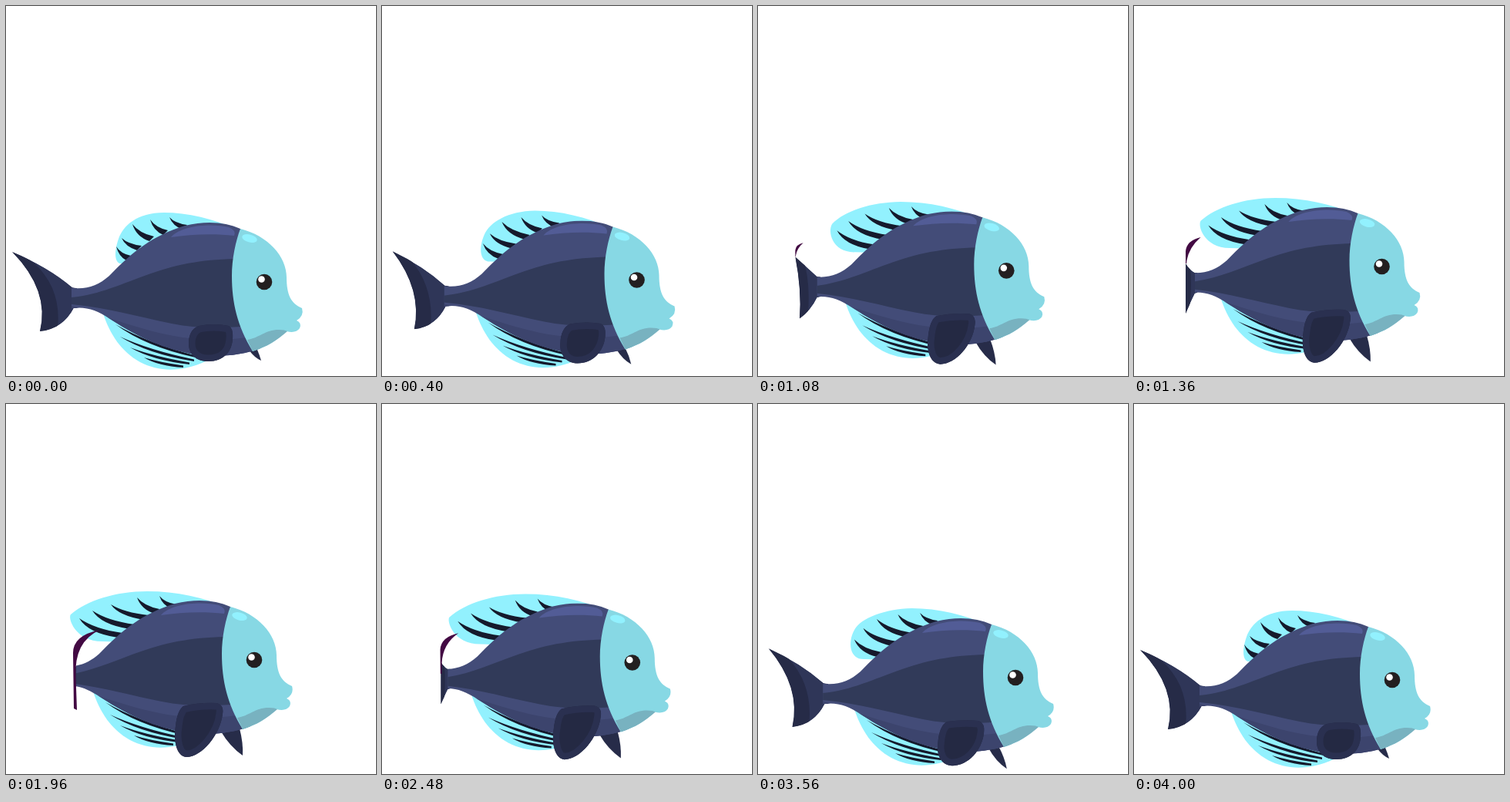
Recreate the animation shown at these times as an HTML page. Size 480 by 480 pixels, loop 4.04 s.

```html
<!DOCTYPE html>
<html lang="en">
<head>
<meta charset="utf-8">
<title>Swimming fish</title>
<style>
  html, body { margin: 0; width: 100%; height: 100%; overflow: hidden; background: #fff; }
  svg { display: block; width: 100vw; height: 100vh; }
</style>
</head>
<body>
<svg viewBox="0 0 480 480">
  <defs>
    <clipPath id="bodyClip">
      <path d="M80 365C102 369 118 364 134 350C165 318 190 298 232 285C262 278 285 281 304 289L340 340L330 444C300 456 260 456 235 450C190 440 160 422 135 406C115 393 102 389 80 393Z"/>
    </clipPath>
    <clipPath id="rootClip"><rect id="root" y="200" width="400" height="280"/></clipPath>
    <clipPath id="tailClip"><path id="tailEdge"/></clipPath>
    <clipPath id="pectoralClip"><path id="pectoralEdge"/></clipPath>
  </defs>
  <g id="fish">
    <g clip-path="url(#tailClip)">
      <path id="tail" fill="#2f3658"/>
      <path id="tailShade" fill="#262b47"/>
    </g>
    <path id="dorsal" fill="#92f1fe"/>
    <path id="spines" fill="#151a2c"/>
    <path id="fold" fill="#430a43"/>

    <path fill="#92f1fe" d="M126 399C135 426 149 448 174 462C199 475 228 475 259 461L260 430Z"/>
    <g id="rays" fill="#151a2c"></g>

    <path id="pelvic" fill="#272c49"/>

    <g clip-path="url(#rootClip)">
      <g clip-path="url(#bodyClip)">
        <path fill="#434c78" d="M70 260H345V470H70Z"/>
        <path fill="#3c446d" d="M70 384C130 402 190 428 250 432C285 434 305 432 335 426V470H70Z"/>
        <path fill="#313a59" d="M70 379C115 378 145 362 188 347C225 334 260 328 305 328V416C270 418 245 418 215 412C165 402 125 389 70 386Z"/>
        <path fill="#525c96" d="M214 300C228 284 268 282 289 287Q299 291 296 298C270 295 240 296 214 300Z"/>
      </g>
    </g>

    <path fill="#87d8e4" d="M304 289C340 298 364 325 364 352C364 375 370 386 384 392Q387 402 377 408Q384 411 381 418Q376 425 364 422C350 435 340 441 320 448C300 415 293 385 293 350C293 328 298 305 304 289Z"/>
    <path fill="#78b2c0" d="M313 433C328 431 336 420 354 420Q362 420 365 422C350 435 340 441 320 448Z"/>
    <ellipse cx="316" cy="301.5" rx="10" ry="5" transform="rotate(14 316 301.5)" fill="#92f1fe"/>
    <circle cx="335" cy="358" r="10.3" fill="#231f20"/>
    <circle cx="331.5" cy="354.5" r="4.3" fill="#fff"/>

    <path id="pectoral" fill="#242943"/>
    <path id="pectoralRim" fill="none" stroke="#2a3050" stroke-width="17" clip-path="url(#pectoralClip)"/>
  </g>
</svg>
<script>
const LOOP = 4040, STEP = 40;
const el = id => document.getElementById(id);
const setPath = (id, d) => el(id).setAttribute('d', d);

// Keys: [time, value]
const drift = [[0, 0], [560, -7], [760, -10], [1140, -13], [1360, -13.5], [1960, -13],
  [2240, -12], [2800, -7], [2960, -5], [3360, -2], [3560, -1], [4000, 0]];
const finKeys = [[0, 0], [760, 1], [1360, 1.88], [1960, 2], [2960, 1.9], [3560, .9], [4000, 0]];
const tailKeys = [[0, 0], [560, .55], [760, 1], [1140, 1.63], [1360, 2], [1960, 3],
  [2800, 1.6], [2960, 1.3], [3360, .5], [3560, .22], [4000, 0]];

// Poses share one structure, so their numbers can be blended.
const poses = {
  dorsal: [
    'M300 290C270 276 235 268 205 268C170 268 152 285 146 302C139 322 142 335 150 334L175 335L290 300Z',
    'M300 290C270 277 235 268 200 268C165 269 133 280 124 295C114 312 118 335 138 334L175 335L290 300Z',
    'M300 290C270 277 235 269 196 269C155 269 118 281 97 299C93 303 102 334 138 334L175 335L290 300Z'],
  spines: [
    '143 312 158 326 150 301 172 313 164 283 188 301 187 277 206 293 212 274 231 286',
    '124 308 157 327 136 293 178 313 154 282 198 302 182 276 212 293 211 274 230 286',
    '108 304 160 325 125 294 176 314 149 286 194 302 183 277 208 294 212 275 230 288'],
  pelvic: [
    'M315 446L326 446Q329 453 331 460Q322 456 315 446Z',
    'M298 449L311 446Q320 462 323 478Q308 468 298 449Z',
    'M292 451L316 447Q321 466 320 482Q303 470 292 451Z'],
  pectoral: [
    'M250 415Q270 411 289 415Q295 418 294 432C293 448 283 461 262 461C246 461 237 451 237 438Q237 420 250 415Z',
    'M246 415Q268 412 287 414Q296 417 294 430C291 453 273 473 252 473.5C238 473 232 459 234 444Q236 420 246 415Z',
    'M243 418Q264 413 286 414Q296 416 294 428C291 455 267 484 247 484C234 483 230 462 233 444Q235 424 243 418Z'],
  tail: [
    'M8 319Q54 338 86 365L92 366V392L88 392Q74 419 44 422Q57 369 8 319Z',
    'M39 324.5Q64 342 86 365L92 366V392L86 393Q74 419 51 421.5Q57 376 39 324.5Z',
    'M80.5 354Q85 362 92.5 366L96 366V392L92.5 393Q88 402 80.5 419Q80.5 390 80.5 354Z',
    'M103 366Q104 367 104 367L105 367V392L104 392Q104 393 103 393Q103 380 103 366Z'],
  tailShade: [
    'M0 310L36 333Q75 369 66 425H30Z',
    'M25 310L54 330Q73 373 68 425H30Z',
    'M76 340L84 344Q91 376 84 425H70Z',
    'M100 350L104 350Q104 376 104 425H90Z'],
  fold: [
    'M8 319Q8 319 8 319L8 319L8 319L8 319Q8 319 8 319Z',
    'M39 324Q39 324 39 324L39 324L39 324L39 324Q39 324 39 324Z',
    'M100 320Q82 324 80.5 338L80.5 354L81.5 354L82 350Q85 333 100 320Z',
    'M135 319Q100 326 100 349L101 421L105 423L103.5 380Q101 334 135 319Z']
};
const rootKeys = [85, 86, 92.5, 104];

// Monotone cubic interpolation, flat at both ends.
function track(keys, t) {
  const n = keys.length;
  if (t >= keys[n - 1][0]) return keys[n - 1][1];
  const rise = i => (keys[i + 1][1] - keys[i][1]) / (keys[i + 1][0] - keys[i][0]);
  const slope = i => {
    if (i === 0 || i === n - 1) return 0;
    const a = rise(i - 1), b = rise(i);
    return a * b > 0 ? 2 * a * b / (a + b) : 0;
  };
  let i = 0;
  while (t >= keys[i + 1][0]) i++;
  const h = keys[i + 1][0] - keys[i][0], u = (t - keys[i][0]) / h, v = 1 - u;
  return keys[i][1] * (1 + 2 * u) * v * v + slope(i) * h * u * v * v
    + keys[i + 1][1] * u * u * (3 - 2 * u) - slope(i + 1) * h * u * u * v;
}

function blend(list, p) {
  const i = Math.min(Math.floor(p), list.length - 2), f = p - i;
  const next = String(list[i + 1]).match(/[\d.]+/g);
  let k = 0;
  return String(list[i]).replace(/[\d.]+/g, a => (+a + (next[k++] - a) * f).toFixed(2));
}

function spine(x, y, bx, by) {
  const dx = bx - x, dy = by - y;
  return `M${x} ${y}Q${x + .38 * dx} ${y + .66 * dy} ${bx + 4} ${by - 2}`
    + `L${bx - 2} ${by + 4}Q${x + .22 * dx} ${y + .92 * dy} ${x} ${y}Z`;
}

// Anal fin rays: start and end points
for (const [x, y, ex, ey] of [[142, 413, 246, 455], [148, 429, 244, 460], [161, 443, 238, 464], [179, 456, 230, 468]]) {
  const ray = document.createElementNS('http://www.w3.org/2000/svg', 'path');
  const mx = x + .4 * (ex - x), my = y + .6 * (ey - y);
  ray.setAttribute('d', `M${x} ${y}Q${mx} ${my - 1} ${ex} ${ey - 1.5}L${ex} ${ey + 1}Q${mx - 2} ${my + 4} ${x} ${y}Z`);
  el('rays').append(ray);
}

function draw(now) {
  const t = Math.min(Math.floor(now % LOOP / STEP) * STEP, 4000);
  const lift = -13 * (1 - Math.cos(t / 2000 * Math.PI));
  const fin = track(finKeys, t), tail = track(tailKeys, t);
  el('fish').setAttribute('transform', `translate(${track(drift, t)} ${lift})`);

  for (const id of ['dorsal', 'pelvic', 'pectoral']) setPath(id, blend(poses[id], fin));
  for (const id of ['tail', 'tailShade', 'fold']) setPath(id, blend(poses[id], tail));
  setPath('tailEdge', blend(poses.tail, tail));
  setPath('pectoralEdge', blend(poses.pectoral, fin));
  setPath('pectoralRim', blend(poses.pectoral, fin));

  const s = blend(poses.spines, fin).split(' ').map(Number);
  let d = '';
  for (let i = 0; i < s.length; i += 4) d += spine(s[i], s[i + 1], s[i + 2], s[i + 3]);
  setPath('spines', d);
  el('root').setAttribute('x', blend(rootKeys, tail));
}

let start;
function tick(now) {
  start ??= now;
  draw(now - start);
  requestAnimationFrame(tick);
}
draw(0);
requestAnimationFrame(tick);
</script>
</body>
</html>
```
